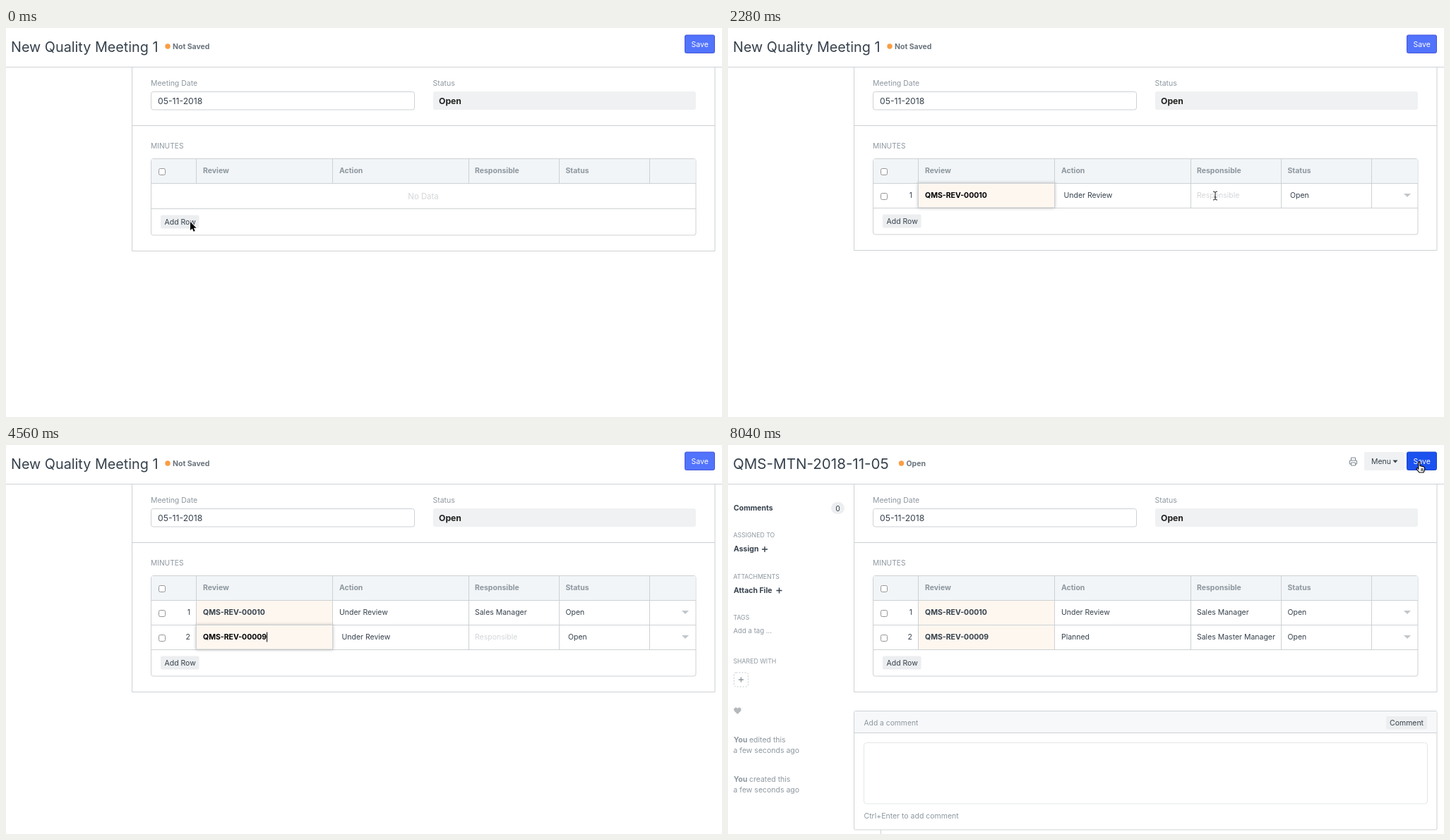
Recreate the animation shown at these times as an HTML page. Size 1014 by 552 pixels, loop 8.1 s.

```html
<!DOCTYPE html>
<html lang="en">
<head>
<meta charset="utf-8">
<title>Quality meeting form</title>
<style>
html, body { margin: 0; width: 100%; height: 100%; overflow: hidden; background: #fff; }
svg { display: block; width: 1014px; height: 552px; font: 10.49px Inter, sans-serif; font-optical-sizing: none; }
.menu { filter: drop-shadow(0 4px 5px #0003); }
.focus { filter: drop-shadow(0 0 2px #0004); }
</style>
</head>
<body>
<svg id="stage" viewBox="0 0 1014 552"></svg>
<script>
const LOOP = 8100, SIZE = 10.49;
const INK = '#36414c', MUTED = '#8d979f', FAINT = '#d3d6d9', LINE = '#cdd1d4', LINK = '#5368df', PALE = '#eff1f2', PEACH = '#fef7f0';
const stage = document.getElementById('stage');
const pen = document.createElement('canvas').getContext('2d');

const text = (x, y, s, fill = INK, weight = 400, size = SIZE, anchor = 'start') =>
  `<text x="${x}" y="${y}" fill="${fill}" font-weight="${weight}" font-size="${size}" text-anchor="${anchor}">${s}</text>`;
const bold = (x, y, s, fill = INK, size = SIZE) => text(x, y, s, fill, 700, size);
const box = (x, y, x2, y2, fill = 'none', stroke = 'none', r = 0, more = '') =>
  `<rect x="${x}" y="${y}" width="${x2 - x}" height="${y2 - y}" rx="${r}" fill="${fill}" stroke="${stroke}" ${more}/>`;
const path = (d, stroke = LINE, fill = 'none', more = '') => `<path d="${d}" stroke="${stroke}" fill="${fill}" ${more}/>`;
const plus = (x, y, r, color, w = 1.4) => path(`M${x - r} ${y}h${2 * r}M${x} ${y - r}v${2 * r}`, color, 'none', `stroke-width="${w}"`);
const within = (t, a, b) => t >= a && t < b;
const typed = (t, s, start, step) => s.slice(0, Math.max(0, Math.ceil((t - start) / step)));

const reviews = ['QMS-REV-00010', 'QMS-REV-00009', 'QMS-REV-00008'];
const roles = ['Sales Manager', 'Sales Master|Manager', 'Sales User'];
const cells = { review: [269.5, 462.5], action: [462.5, 655.5], role: [655.5, 783.5] };

// start time, row, focused cell
const focuses = [[0], [900, 1, 'review'], [2340, 1, 'role'], [3840], [4260, 2, 'review'], [4980, 2, 'action'], [5520, 2, 'role'], [7680]];

// time, x, y, pointer shape (empty while typing)
const moves = [
  [0, 261, 275, 'arrow'], [360, 261, 275, 'arrow'], [780, 330, 238, 'beam'], [1020, 330, 238, 'hand'],
  [1380, 309, 271, 'hand'], [1620, 309, 271, 'beam'], [1680, 330, 240, 'beam'], [2220, 690, 238, 'beam'],
  [2520, 690, 238, ''], [3360, 690, 238, 'arrow'], [3720, 246, 274, 'arrow'], [3900, 246, 274, 'arrow'],
  [4200, 320, 272, 'beam'], [4380, 320, 272, ''], [4680, 320, 272, 'arrow'], [4980, 520, 272, 'arrow'],
  [5160, 520, 272, 'arrow'], [5460, 695, 269, 'beam'], [5640, 695, 269, ''], [7020, 695, 269, 'arrow'],
  [7560, 979, 24, 'hand'], [LOOP, 979, 24, 'hand']
];
const pointers = {
  arrow: path('M0 0V12l2.8-2.6 1.9 4.4 2-.9-1.9-4.2H8.6Z', '#fff', '#000', 'stroke-width="1.6" paint-order="stroke"'),
  hand: path('M-1.2.6q1.1-1.4 2.2 0V5.5l5 1.2q1.5.5 1.5 2v3L6 15H0l-4-5q0-2 2-1l.8 1Z', '#000', '#fff', 'stroke-width="1.2"') +
    path('M3 9v4M5 9v4', '#000'),
  beam: path('M-3-6q3 0 3 1.5q0-1.5 3-1.5M0-5V5M-3 6q3 0 3-1.5q0 1.5 3 1.5M-1.5 2h3', '#222')
};

function pointer(t) {
  const i = moves.findIndex(m => m[0] > t);
  const [t0, x0, y0, kind] = moves[i - 1], [t1, x1, y1] = moves[i];
  if (!kind) return '';
  const u = (t - t0) / (t1 - t0), k = u * u * (3 - 2 * u);
  return `<g transform="translate(${x0 + (x1 - x0) * k} ${y0 + (y1 - y0) * k})">${pointers[kind]}</g>`;
}

function header(t, saved) {
  const dot = saved ? 245.5 : 229;
  let s = path('M0 55.5H1014') +
    (saved ? text(7, 34, 'QMS-MTN-2018-11-05', INK, 400, 20.6) : text(7, 34, 'New Quality Meeting 1', INK, 400, 19.8)) +
    `<circle cx="${dot}" cy="26" r="3.7" fill="#fb9d44"/>` +
    bold(dot + 7, 30, saved ? 'Open' : 'Not Saved', '#6a747d') +
    (t >= 7500 ? box(961.5, 10, 1003.5, 35.5, '#1b51ef', '#1745d0', 2) : box(961.5, 10, 1003.5, 35.5, '#5273fb', '#4556df', 2)) +
    text(970.5, 27, 'Save', '#fff');
  if (saved) s += box(901, 10, 958, 36, PALE, 'none', 2) + text(911, 27, 'Menu') + path('M941.5 21.5h7l-3.5 4Z', 'none', INK) +
    path('M882.5 22v-4h6v4M882.5 27h-2v-5h10v5h-2M882.5 25h6v4h-6Z', '#7d878f');
  return s;
}

const checkbox = y => box(216.5, y, 225.5, y + 9, '#fff', '#959595', 2);
const arrowDown = y => path(`M957 ${y}h10l-5 5Z`, 'none', '#c1c6ca');

function form(bottom, table) {
  return path(`M178.5 56V${bottom}H1004V56M178.5 138.5H1004`) +
    text(205, 82, 'Meeting Date', MUTED) + box(205.5, 90.5, 578.5, 116, '#fff', LINE, 3) + text(215, 107.5, '05-11-2018', INK, 400, 12.2) +
    text(604.5, 82, 'Status', MUTED) + box(605, 90, 977, 116, PALE, 'none', 3) + bold(613, 107.5, 'Open', '#222', 12.2) +
    text(205, 170.5, 'MINUTES', MUTED, 400, 10.2) +
    box(205.5, 185.5, 977, table, '#fff', LINE, 3) + box(206, 186, 976.5, 220, '#f2f5f7') +
    path('M205.5 220.5H977' + [269.5, 462.5, 655.5, 783.5, 911.5].map(x => `M${x} 185.5V220.5`).join('')) +
    checkbox(199.5) + bold(279, 206, 'Review', MUTED) + bold(472, 206, 'Action', MUTED) +
    bold(664, 206, 'Responsible', MUTED) + bold(792.5, 206, 'Status', MUTED);
}

function row(n, data, editing, focus, caretOn) {
  const y = 185.5 + 35 * n, base = y + 20.5, dx = editing ? 3.5 : 0;
  let s = box(270, y + .5, 462, y + 35, PEACH) +
    path(`M205.5 ${y + 35}H977` + [269.5, 462.5, 655.5, 783.5, 911.5].map(x => `M${x} ${y}v35`).join(''));
  if (focus) {
    const [a, b] = cells[focus];
    s += box(a, y, b, y + 34.5, focus === 'review' ? PEACH : '#fff', LINE, 0, 'class="focus"');
  }
  s += checkbox(y + 14) + text(261, base, n, INK, 400, SIZE, 'end') + arrowDown(y + 14.5) +
    (data.review ? bold(279, base, data.review, editing ? '#000' : INK) : bold(279, base, 'Review', '#d8d4d0')) +
    text(472 + dx, base, data.action) +
    (data.role ? text(664, base, data.role) : text(664, base, 'Responsible', FAINT)) +
    text(792.5 + dx, base, 'Open');
  if (caretOn && (focus === 'review' || focus === 'role')) {
    pen.font = `${focus === 'review' ? 700 : 400} ${SIZE}px Inter, sans-serif`;
    const x = (focus === 'review' ? 279 : 664) + pen.measureText(data[focus]).width + .5;
    s += path(`M${x} ${y + 10}v14`, '#000');
  }
  return s;
}

function dropdown(n, focus, items, active, doc) {
  const [a, b] = cells[focus], top = 220 + 35 * n, x = a + 12;
  let y = top, body = '';
  items.forEach((item, i) => {
    const lines = item.split('|'), h = 31.5 + 12 * (lines.length - 1);
    if (i === active) body += box(a + 1, y, b - .5, y + h, PALE);
    lines.forEach((line, j) => body += bold(x, y + 19.5 + 12 * j, line, i === active ? '#000' : INK));
    y += h;
  });
  body += plus(x + 4, y + 15.5, 4, LINK, 1.8) + text(x + 15.5, y + 19.5, 'Create a new ' + doc, LINK) +
    `<circle cx="${x + 4}" cy="${y + 46}" r="3.2" fill="none" stroke="${LINK}" stroke-width="1.5"/>` +
    path(`M${x + 6.3} ${y + 48.3}l3 3`, LINK, 'none', 'stroke-width="1.8"') + text(x + 17, y + 51, 'Advanced Search', LINK);
  return box(a + 1, top, b - .5, y + 63, '#fff', '#d5d8db', 3, 'class="menu"') + body;
}

function menus(t) {
  if (within(t, 1020, 1620)) return dropdown(1, 'review', reviews, 0, 'Quality Review');
  if (within(t, 2640, 3060)) return dropdown(1, 'role', roles, 0, 'Role');
  if (within(t, 4320, 4500)) return dropdown(2, 'review', reviews, t < 4380 ? 0 : 1, 'Quality Review');
  if (within(t, 5820, 6900)) return dropdown(2, 'role', roles, t < 6360 ? 0 : 1, 'Role');
  return '';
}

function sidebar() {
  const small = (y, s) => text(7.5, y, s, MUTED, 400, 8.74);
  const log = (y, verb) => bold(8, y, 'You', MUTED) + text(30, y, verb + ' this', MUTED) + text(7.5, y + 15, 'a few seconds ago', MUTED);
  return bold(8, 92.5, 'Comments') + box(146, 81, 165, 98, '#eceef0', 'none', 8.5) + text(155.5, 93.5, '0', INK, 400, SIZE, 'middle') +
    small(131, 'ASSIGNED TO') + bold(8, 151, 'Assign') + plus(52, 148, 4, INK) +
    small(189.5, 'ATTACHMENTS') + bold(8, 209.5, 'Attach File') + plus(72.5, 206.5, 4, INK) +
    small(248, 'TAGS') + text(7.5, 266.5, 'Add a tag ...', MUTED, 400, 9.6) +
    small(309.5, 'SHARED WITH') + box(8.5, 323, 28.5, 343, 'none', '#c4c9cd', 3, 'stroke-dasharray="2 2"') + plus(18.5, 333, 3.5, MUTED) +
    path('M13.5 382l-4.3-4.3c-3-3.5 2-7.5 4.3-3.7c2.3-3.8 7.3.2 4.3 3.7Z', 'none', '#b5b9bc') +
    log(422, 'edited') + log(478, 'created');
}

function comments() {
  return box(178.5, 377.5, 1004, 546, '#fff', LINE, 2) + box(179, 378, 1003.5, 408, '#f7f8fa') + path('M178.5 408.5H1004M216.5 546V552') +
    text(192.5, 397.5, 'Add a comment', MUTED, 400, 10.3) +
    box(932, 385, 990, 403.5, '#eceef0', 'none', 2) + text(937, 397.5, 'Comment') +
    box(192.5, 422.5, 990.5, 509, '#fff', '#e3e6e8', 4) + text(192.5, 529.5, 'Ctrl+Enter to add comment', MUTED);
}

function scene(t) {
  const count = t < 240 ? 0 : t < 3840 ? 1 : 2;
  const end = count ? 220.5 + 35 * count : 256.5;
  const saved = t >= 7740;
  const [since, focusRow, focus] = focuses.findLast(f => f[0] <= t);
  const rows = [
    { review: t < 1620 ? '' : reviews[0], action: 'Under Review', role: t < 3060 ? typed(t, 'sales', 2520, 60) : 'Sales Manager' },
    { review: t < 4500 ? '' : reviews[1], action: t < 5100 ? 'Under Review' : 'Planned', role: t < 6900 ? typed(t, 'sales', 5700, 90) : 'Sales Master Manager' }
  ];
  const lastEdit = Math.max(since, ...[1620, 3060, 4500, 6900].filter(e => e <= t));
  const caretOn = (t - lastEdit) % 1060 < 530;

  let s = header(t, saved) + form(end + 60, end + 37.5);
  if (!count) s += text(591, 243, 'No Data', FAINT, 400, 11.36, 'middle') + path('M205.5 256.5H977');
  for (let n = 1; n <= count; n++)
    s += row(n, rows[n - 1], n === count && t < 7680, n === focusRow && focus, caretOn);
  s += box(219, end + 9, 273.5, end + 28, '#eceef0', 'none', 2) + text(224.5, end + 22.5, 'Add Row');
  if (saved) s += sidebar() + comments();
  return s + menus(t) + pointer(t);
}

const start = performance.now();
let shown = '';
function draw() {
  const t = (performance.now() - start) % LOOP;
  const next = scene(Math.floor(t / 60) * 60);
  if (next !== shown) stage.innerHTML = shown = next;
  requestAnimationFrame(draw);
}
draw();
</script>
</body>
</html>
```
